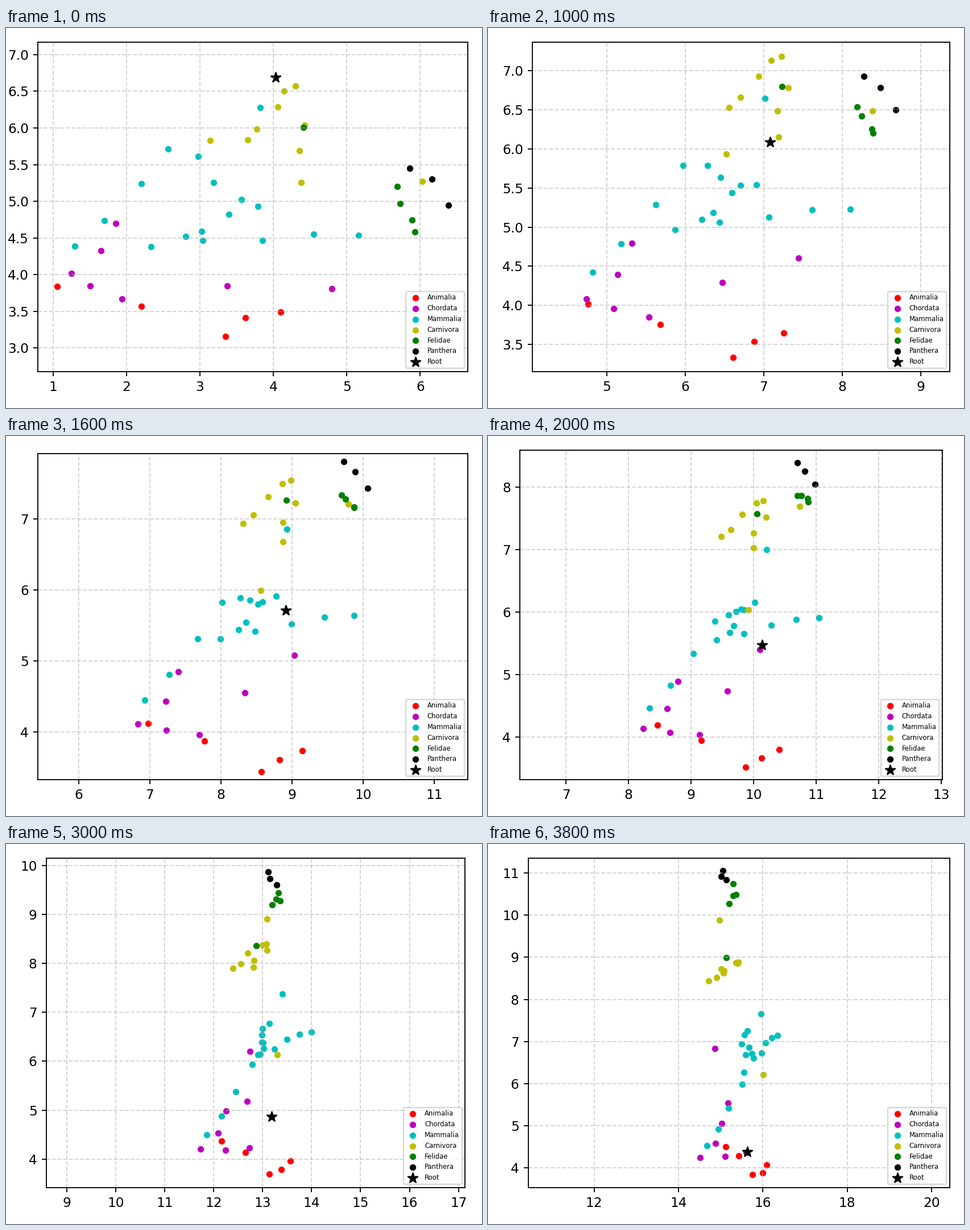
Write a matplotlib script that moves like this. It is 837 px wide and 669 px high and loops after 4 s.

```python
import numpy as np
import matplotlib.pyplot as plt
from matplotlib.animation import FuncAnimation

DPI = 167.4
STEPS = 20
JITTER = 0.12

# Each group is a chain of dots given by a few key dots,
# {dot index: (start x, start y, end x, end y)}; the others lie between them.
GROUPS = {
    "Animalia": ("r", {0: (1.06, 3.84, 15.12, 4.51),
                       2: (3.345, 3.16, 15.75, 3.84),
                       4: (4.10, 3.49, 16.09, 4.08)}),
    "Chordata": ("m", {0: (1.85, 4.70, 15.03, 5.06),
                       2: (1.25, 4.02, 14.52, 4.25),
                       4: (1.94, 3.67, 15.61, 4.37),
                       6: (4.80, 3.81, 14.86, 6.84)}),
    "Mammalia": ("c", {0: (1.30, 4.39, 14.67, 4.53),
                       3: (2.57, 5.71, 15.51, 5.99),
                       7: (3.79, 4.93, 15.63, 7.26),
                       11: (2.33, 4.38, 15.78, 6.61),
                       15: (5.16, 4.54, 16.35, 7.15),
                       16: (3.82, 6.28, 15.96, 7.66)}),
    "Carnivora": ("y", {0: (6.03, 5.27, 14.97, 9.88),
                        1: (4.38, 5.26, 15.06, 8.63),
                        4: (4.30, 6.57, 15.42, 8.88),
                        8: (3.65, 5.84, 14.72, 8.44),
                        9: (3.14, 5.83, 16.01, 6.22)}),
    "Felidae": ("g", {0: (4.41, 6.01, 15.13, 8.99),
                      1: (5.69, 5.20, 15.20, 10.27),
                      4: (5.93, 4.58, 15.30, 10.74)}),
    "Panthera": ("k", {0: (5.86, 5.45, 15.05, 11.05),
                       2: (6.38, 4.95, 15.13, 10.84)}),
    "Root": ("k", {0: (4.03, 6.69, 15.63, 4.38)}),
}

rng = np.random.default_rng(4)


def fill_chain(keys):
    """Return the (start, end) positions of every dot in a chain."""
    at = list(keys)
    dots = np.arange(at[-1] + 1)
    cols = [np.interp(dots, at, col) for col in zip(*keys.values())]
    loose = ~np.isin(dots, at)
    path = np.array(cols) + loose * rng.uniform(-JITTER, JITTER, (4, len(dots)))
    return path[:2], path[2:]


chains = {name: (color, *fill_chain(keys))
          for name, (color, keys) in GROUPS.items()}

fig = plt.figure(figsize=(837.001 / DPI, 669.001 / DPI), dpi=DPI)


def draw(step):
    # Margins are reset too, since the layout starts from the previous ones
    fig.clf()
    fig.subplots_adjust(left=0.125, right=0.9, bottom=0.11, top=0.88)
    ax = fig.add_subplot()
    t = step / (STEPS - 1)
    for name, (color, start, end) in chains.items():
        marker, size = ("*", 60) if name == "Root" else ("o", 15)
        x, y = start + t * (end - start)
        ax.scatter(x, y, s=size, c=color, marker=marker, label=name)
    ax.axis("equal")
    ax.grid(linestyle="--", alpha=0.55)
    ax.legend(loc="lower right", fontsize=5)
    fig.tight_layout()
    return []


anim = FuncAnimation(fig, draw, frames=STEPS, init_func=lambda: draw(0),
                     interval=200, repeat=True, repeat_delay=0)
plt.show()
```
